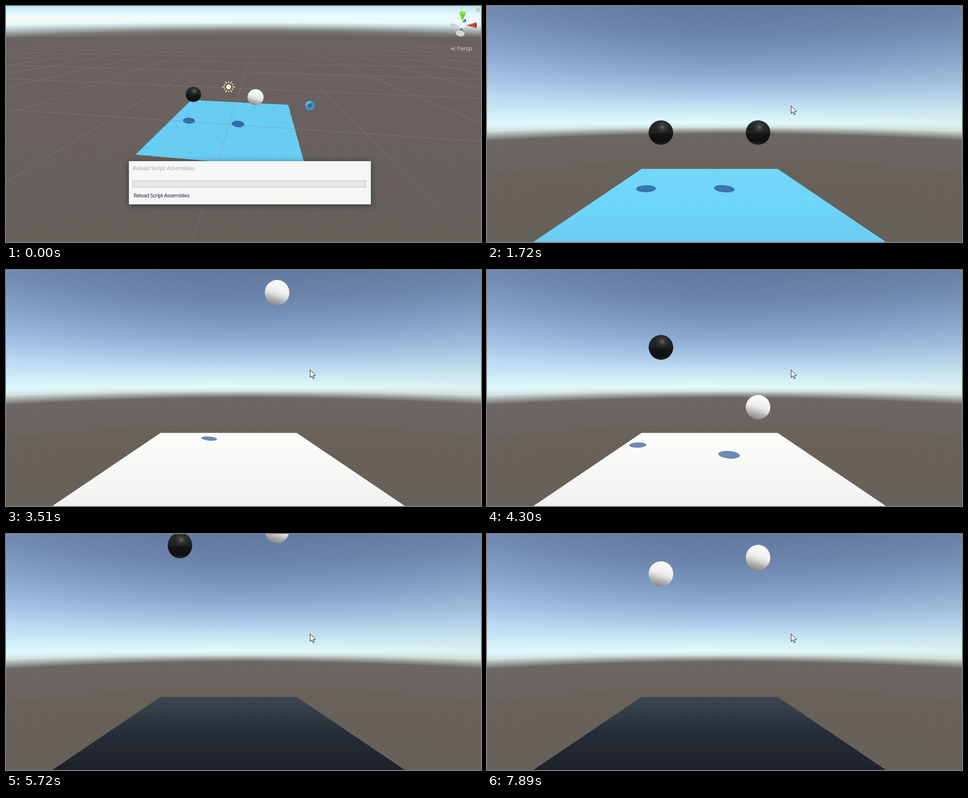
Write an HTML page with a canvas that moves like this. It is 1005 by 502 pixels and loops after 8 s.

```html
<!DOCTYPE html>
<html lang="en">
<head>
<meta charset="utf-8">
<title>Bouncing balls</title>
<style>
html, body { margin: 0; width: 1005px; height: 502px; overflow: hidden; }
canvas { display: block; }
</style>
</head>
<body>
<canvas id="stage" width="1005" height="502"></canvas>
<script>
const W = 1005, H = 502, LOOP = 8000, FLOOR = 402;
let ctx = document.getElementById('stage').getContext('2d');

// The picture is refreshed in steps: [first, last, count] in ms
const ticks = [[0, 0, 1], [900, 1020, 2], [1180, 1300, 2], [1720, 1720, 1], [2000, 2730, 7],
  [2850, 3210, 4], [3360, 3510, 2], [3670, 3910, 3], [4060, 4540, 5], [4690, 5050, 4],
  [5190, 5330, 2], [5480, 6080, 6], [6220, 6220, 1], [6360, 6720, 4], [6870, 6990, 2],
  [7140, 7140, 1], [7290, 7890, 6]
].flatMap(([a, b, n]) => Array.from({ length: n }, (_, i) => n > 1 ? a + (b - a) * i / (n - 1) : a));

// Each hop: start, time of apex, height of apex, end (seconds and pixels)
const balls = [
  { x: 368, whiteFrom: 7.115, tilt: -0.03, shadow: 25.9,
    hops: [[0, 1.7, 269, 2.33], [2.33, 3.4, -42, 4.72], [4.72, 6.03, 2, 7.115], [7.115, 8.233, 52, 9.35]] },
  { x: 573.5, whiteFrom: 2.29, tilt: 0.09, shadow: 27.5,
    hops: [[0, 1.7, 269, 2.29], [2.29, 3.39, 44, 4.484], [4.484, 5.85, -12, 7.003], [7.003, 8.152, 31, 9.3]] }
];

const planes = [
  { until: 2.33, stops: ['#73d7fc', '#6fd4f9', '#69cdf2'], shade: '#3a74ad' },
  { until: 4.72, stops: ['#fdfefb', '#f7f8f6', '#f1f1f1'], shade: '#6d89b1' },
  { until: 9, stops: ['#3d4751', '#262d38', '#1e212b'] }
];

function gradient(x0, y0, x1, y1, stops) {
  const g = ctx.createLinearGradient(x0, y0, x1, y1);
  stops.forEach(([at, color]) => g.addColorStop(at, color));
  return g;
}

function path(points) {
  ctx.beginPath();
  points.forEach(([x, y]) => ctx.lineTo(x, y));
  ctx.closePath();
}

function poly(points, color) {
  path(points);
  ctx.fillStyle = color;
  ctx.fill();
}

function ellipse(x, y, rx, ry, color, turn = 0) {
  ctx.beginPath();
  ctx.ellipse(x, y, rx, ry, turn, 0, 7);
  ctx.fillStyle = color;
  ctx.fill();
}

function line(a, b, color, width = 1) {
  ctx.beginPath();
  ctx.moveTo(...a);
  ctx.lineTo(...b);
  ctx.strokeStyle = color;
  ctx.lineWidth = width;
  ctx.stroke();
}

function text(str, x, y, size, color, spacing = '0px') {
  ctx.font = `${size}px "Open Sans", sans-serif`;
  ctx.letterSpacing = spacing;
  ctx.fillStyle = color;
  ctx.fillText(str, x, y);
}

// Draws once into an offscreen layer
function layer(draw) {
  const main = ctx, c = document.createElement('canvas');
  c.width = W;
  c.height = H;
  ctx = c.getContext('2d');
  draw();
  ctx = main;
  return c;
}

// Sky and ground; every stop is [y, color, bend towards the sides]
function backdrop(stops, mid) {
  for (let x = 0; x < W; x += 5) {
    const k = ((x - mid) / 500) ** 2;
    const at = ([y, color, bend]) => [Math.min(1, Math.max(0, (y + bend * k + 60) / 562)), color];
    ctx.fillStyle = gradient(0, -60, 0, H, stops.map(at));
    ctx.fillRect(x, 0, 5, H);
  }
}

function sphere(x, y, r, white, stretch = 0) {
  ctx.save();
  ctx.translate(x, y);
  ctx.scale(r, r + stretch);
  if (white) {
    ellipse(0, 0, 1, 1, gradient(0.28, -0.95, -0.28, 0.95,
      [[0, '#fbfbfb'], [0.45, '#efefef'], [0.62, '#d6d6d7'], [0.76, '#b2b3b5'], [1, '#8c8987']]));
  } else {
    ellipse(0, 0, 1, 1, gradient(0, -1, 0, 1,
      [[0, '#2a2d30'], [0.5, '#1e2123'], [0.55, '#151617'], [0.85, '#0e0f0f'], [1, '#25282b']]));
    const g = ctx.createRadialGradient(0.1, -0.45, 0, 0.1, -0.45, 0.6);
    g.addColorStop(0, 'rgba(125,118,108,.85)');
    g.addColorStop(0.35, 'rgba(88,84,78,.5)');
    g.addColorStop(1, 'rgba(40,42,44,0)');
    ellipse(0, 0, 0.97, 0.97, g);
  }
  ctx.restore();
}

// Ground grid seen through two vanishing points
const AV = 0.0613, AU = -0.00885;
function project(u, v) {
  const a = AV * v, b = AU * u, d = 1 + a + b;
  return [(472 + 535 * a - 2510 * b) / d, (252 + 50 * a + 50 * b) / d];
}

function grid() {
  for (let i = -100; i <= 150; i++) {
    const major = i % 10 === 0;
    if (!major && Math.abs(i) > 20) continue;
    const color = major ? 'rgba(140,135,132,.55)' : 'rgba(125,125,122,.11)';
    if (1 + AV * i > 0.08) {
      line(project(-200, i), project(Math.min(100, (0.95 + AV * i) / -AU), i), color);
    }
    if (i < 100) line(project(i, (-0.95 - AU * i) / AV), project(i, 150), color);
  }
}

function gizmo() {
  poly([[965, 36], [972, 26], [974, 33]], '#3c74d8');
  poly([[938, 36], [958, 41], [939, 44]], '#c9cdcd');
  ellipse(939, 40, 1.5, 4, '#e6e9e9');
  poly([[995, 35], [974, 41], [995, 47]], '#d8432b');
  ellipse(994, 41, 2, 6, '#a93422');
  poly([[959, 14], [973, 14], [966, 33]], '#79cf2f');
  ellipse(966, 14, 7, 3, '#94e24a');
  poly([[959, 36], [972, 35], [972, 46], [960, 47]], '#f0f2f2');
  poly([[964, 46], [970, 56], [953, 57]], '#7b7d7e');
  ellipse(961, 58, 9.5, 6.5, '#d4d5d5', 0.2);
  text('y', 962, 7, 10, '#aebfc2');
  ctx.strokeStyle = '#aebdc0';
  ctx.strokeRect(996, 7, 5, 5);
  ctx.beginPath();
  ctx.arc(998.5, 6, 2, Math.PI, 0);
  ctx.stroke();
  line([951, 87], [941, 91], '#c7c4c2');
  line([941, 91], [951, 91], '#c7c4c2');
  line([941, 91], [951, 95], '#c7c4c2');
  text('Persp', 954, 95, 12, '#d0cdcb');
}

function sun() {
  for (let i = 0; i < 12; i++) {
    const a = i * Math.PI / 6, p = r => [471 + r * Math.cos(a), 172 + r * Math.sin(a)];
    line(p(8), p(i % 2 ? 11.5 : 13.5), '#fff6d4', 1.7);
  }
  ellipse(471, 172, 6.5, 6.5, '#5e5650');
  ellipse(471, 172, 5.3, 5.3, '#fffbdc');
}

const editor = layer(() => {
  backdrop([[0, '#c5e6f2', 0], [12, '#d8f3fa', 0], [22, '#eafcfd', 0], [35, '#e4fafa', 4],
    [43, '#b5c3c3', 8], [52, '#7d7b79', 12], [63, '#69615f', 12], [502, '#66605b', 0]], 520);
  ctx.fillStyle = gradient(0, 0, 540, 0, [[0, 'rgba(255,247,244,.8)'], [1, 'rgba(255,247,244,0)']]);
  ctx.fillRect(0, 20, 540, 12);
  poly([[392, 200], [597, 210], [635, 348], [274, 316]], '#68cdf3');
  ellipse(387, 244, 12.5, 6.5, '#2c6da8', 0.05);
  ellipse(491, 251, 13.3, 7, '#2c6da8', 0.1);
  ctx.save();
  ctx.beginPath();
  ctx.rect(0, 68, W, H);
  ctx.clip();
  grid();
  ctx.restore();
  ctx.fillStyle = gradient(0, 60, 0, 150, [[0, 'rgba(105,97,95,1)'], [1, 'rgba(105,97,95,0)']]);
  ctx.fillRect(0, 66, W, 84);
  sun();
  sphere(396.5, 188, 16.3, false);
  sphere(528, 194, 17, true);
  gizmo();
});

const scenery = layer(() => {
  backdrop([[0, '#5d749b', -40], [60, '#6880a8', -40], [100, '#7490ba', -38], [140, '#87a5cd', -34],
    [180, '#a3c1e2', -24], [205, '#bbd9ef', -14], [230, '#d3eff8', -4], [249, '#e7fdfb', 3],
    [257, '#d5e4e2', 8], [264, '#a0a5a3', 12], [272, '#6c6664', 15], [326, '#6a6460', 32],
    [327, '#68625a', 32], [502, '#66605a', 0]], 510);
  ctx.fillStyle = gradient(0, 0, W, 0, [[0, 'rgba(180,210,255,.15)'], [0.45, 'rgba(180,210,255,.04)'],
    [1, 'rgba(140,165,170,.12)']]);
  ctx.fillRect(0, 0, W, 262);
});

function spinner() {
  ctx.lineWidth = 5;
  [['#2f96e6', 0, 7], ['#5cbcf3', 3.3, 4.9]].forEach(([color, from, to]) => {
    ctx.beginPath();
    ctx.arc(643, 212, 7.6, from, to);
    ctx.strokeStyle = color;
    ctx.stroke();
  });
}

function pointer() {
  path([[0, 0], [0, 16], [3.6, 12.8], [6.2, 18.6], [8.8, 17.5], [6.2, 12], [11.2, 11.6]]
    .map(([x, y]) => [x + 643.5, y + 212.5]));
  ctx.fillStyle = '#fff';
  ctx.fill();
  ctx.strokeStyle = '#111';
  ctx.lineWidth = 1;
  ctx.stroke();
}

function dialog(label) {
  ctx.save();
  ctx.shadowColor = 'rgba(0,0,0,.5)';
  ctx.shadowBlur = 12;
  ctx.shadowOffsetY = 2;
  ctx.fillStyle = '#f5f7f6';
  ctx.fillRect(260, 330, 512, 92);
  ctx.restore();
  text('Reload Script Assemblies', 268, 349, 11.3, '#9b9c9c');
  ctx.fillStyle = '#e6e6e6';
  ctx.fillRect(268, 371, 494, 15);
  ctx.strokeStyle = '#bcbcbc';
  ctx.lineWidth = 1;
  ctx.strokeRect(268.5, 371.5, 493, 14);
  if (label) text(label, 270, 407, 11, '#0a0a20', '-0.4px');
}

function drawEditor(ms) {
  ctx.drawImage(editor, 0, 0);
  if (ms < 1300) {
    ctx.globalAlpha = ms < 1180 ? 1 : 0.5;
    dialog(ms < 900 ? 'Reload Script Assemblies' : '');
    ctx.globalAlpha = 1;
  }
  if (ms < 1020) spinner();
  else pointer();
}

function height(hops, t) {
  const [start, apex, top, end] = hops.find(h => t < h[3]);
  const span = t < apex ? apex - start : end - apex;
  const base = t < apex && start === 0 ? top : FLOOR;
  return top + (base - top) * ((t - apex) / span) ** 2;
}

function drawGame(t) {
  ctx.drawImage(scenery, 0, 0);
  const plane = planes.find(p => t < p.until);
  const corners = [[327, 346.5], [615, 346.5], [844, 502], [98, 502]];
  poly(corners, gradient(0, 346, 0, H, plane.stops.map((c, i) => [i / 2, c])));

  if (plane.shade) {
    ctx.save();
    path(corners);
    ctx.clip();
    for (const b of balls) {
      const h = FLOOR - height(b.hops, t), d = 1 + 0.00181 * h;
      ellipse(470.5 + (b.x - 470.5 - 0.48 * h) / d, 265 + 153.5 / d,
        b.shadow / d, 11.6 / d / d, plane.shade, b.tilt);
    }
    ctx.restore();
  }
  for (const b of balls) {
    const y = height(b.hops, t);
    sphere(b.x, y, 26, t >= b.whiteFrom, Math.max(0, 251 - y) * 0.006);
  }
  pointer();
}

function frame(now) {
  const time = now % LOOP;
  const ms = ticks.filter(t => t <= time).pop();
  if (ms < 1720) drawEditor(ms);
  else drawGame(ms / 1000);
  requestAnimationFrame(frame);
}

const begin = performance.now();
(function loop() {
  requestAnimationFrame(() => {});
  frame(Math.max(0, performance.now() - begin));
})();
</script>
</body>
</html>
```
